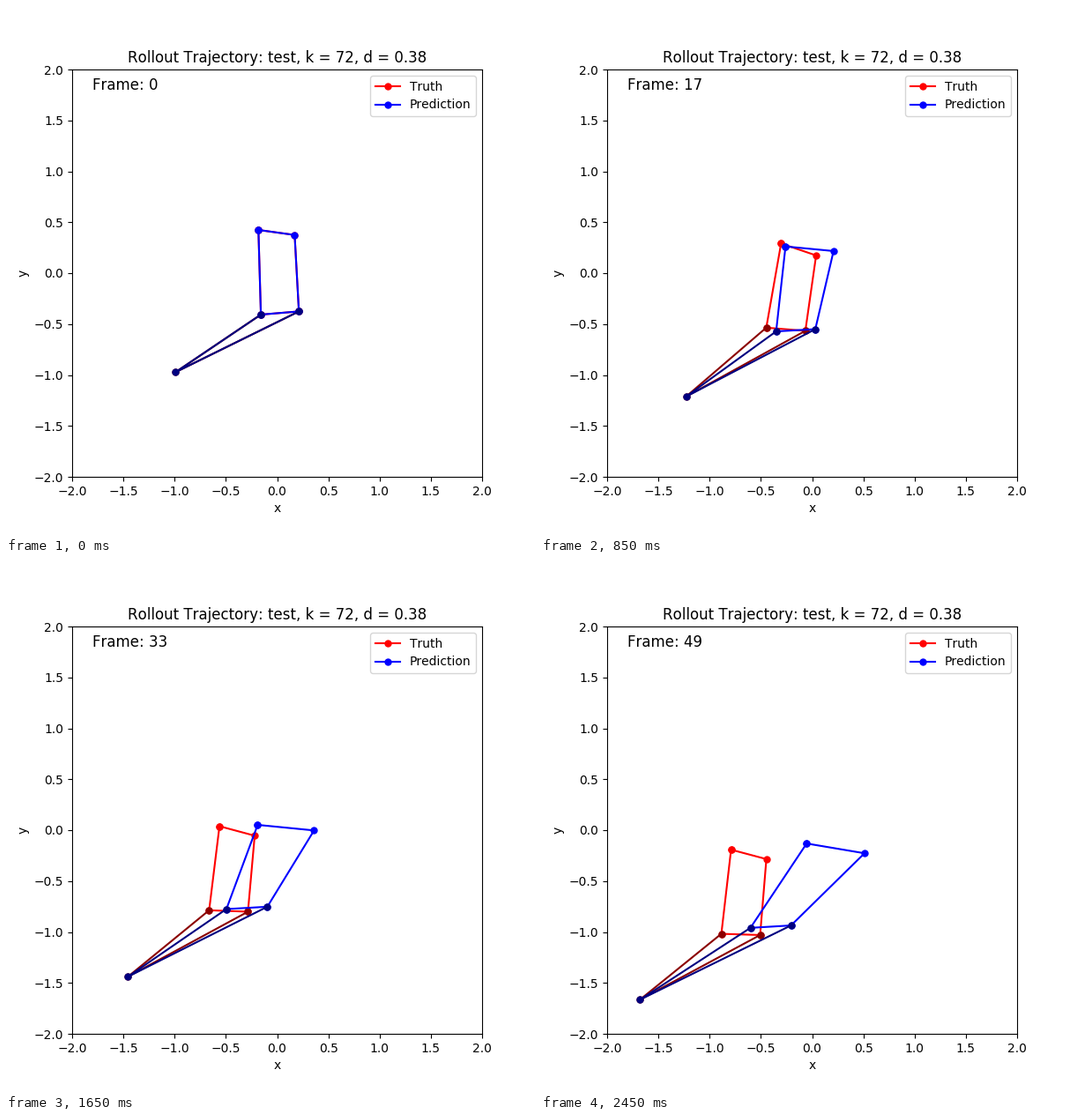
Animation of 600 by 600 pixels, one loop 2500 ms. Source, as a matplotlib script:

```python
import numpy as np
import matplotlib.pyplot as plt
from matplotlib.animation import FuncAnimation

plt.rcParams["text.kerning_factor"] = 6

FRAMES, INTERVAL = 50, 50
LAST = FRAMES - 1
DECAY, SWING = 0.07, 0.12
steps = np.arange(FRAMES)

# Positions are complex numbers, x + y*1j, in stage pixels.
PULL = -1.635 + 1.633j
START = [286.3 + 254j, 327.4 + 259.7j, 332.2 + 346.4j, 289.1 + 350j]

# Per corner: end point, drift per step, sideways kick of the swing.
TRUTH = [
    (216 + 324.8j, PULL, 9.7 - 7j),
    (256 + 335.7j, PULL, 9.3 + 0j),
    (248.4 + 421.8j, PULL, -1.4 - 1.8j),
    (204.4 + 420.2j, PULL, -2.1 - 6.5j),
]
PREDICTION = [
    (300.8 + 318j, 0.78 + 1.34j, 17.5 - 8j),
    (366.6 + 329j, 1.03 + 1.57j, -1 + 0.8j),
    (283.4 + 411j, -0.86 + 1.34j, 4.2 - 5.3j),
    (237.4 + 413.7j, -0.87 + 1.34j, 10 - 5.5j),
]


def to_data(p):
    return np.array([(p.real - 307.5) / 116.25, (303 - p.imag) / 115.5])


def corner_path(start, end, drift, kick):
    """Steady drift to the end point plus a damped swing from the start."""
    origin = end - drift * LAST
    swing = (start - origin) * np.cos(SWING * steps) + kick * np.sin(SWING * steps)
    return to_data(origin + drift * steps + np.exp(-DECAY * steps) * swing)


anchor = to_data(192.3 + 415.3j + PULL * steps)

fig, ax = plt.subplots(figsize=(6, 6), dpi=100)
ax.set(xlim=(-2, 2), ylim=(-2, 2), xlabel="x", ylabel="y",
       title="Rollout Trajectory: test, k = 72, d = 0.38")
counter = ax.text(-1.8, 1.8, "", fontsize=12)

bodies = []
for corners, color, dark, label in (
        (TRUTH, "red", "darkred", "Truth"),
        (PREDICTION, "blue", "navy", "Prediction")):
    box, = ax.plot([], [], "o-", color=color, ms=5, label=label)
    arms, = ax.plot([], [], "o-", color=dark, ms=5)
    paths = [corner_path(s, *c) for s, c in zip(START, corners)]
    bodies.append((paths, box, arms))
ax.legend(loc="upper right")


def update(n):
    counter.set_text(f"Frame: {n}")
    artists = [counter]
    for paths, box, arms in bodies:
        tl, tr, br, bl = (p[:, n] for p in paths)
        box.set_data(*np.array([tl, tr, br, bl, tl]).T)
        arms.set_data(*np.array([bl, anchor[:, n], br]).T)
        artists += [box, arms]
    return artists


anim = FuncAnimation(fig, update, frames=FRAMES, interval=INTERVAL,
                     repeat=True, repeat_delay=0)
plt.show()
```
